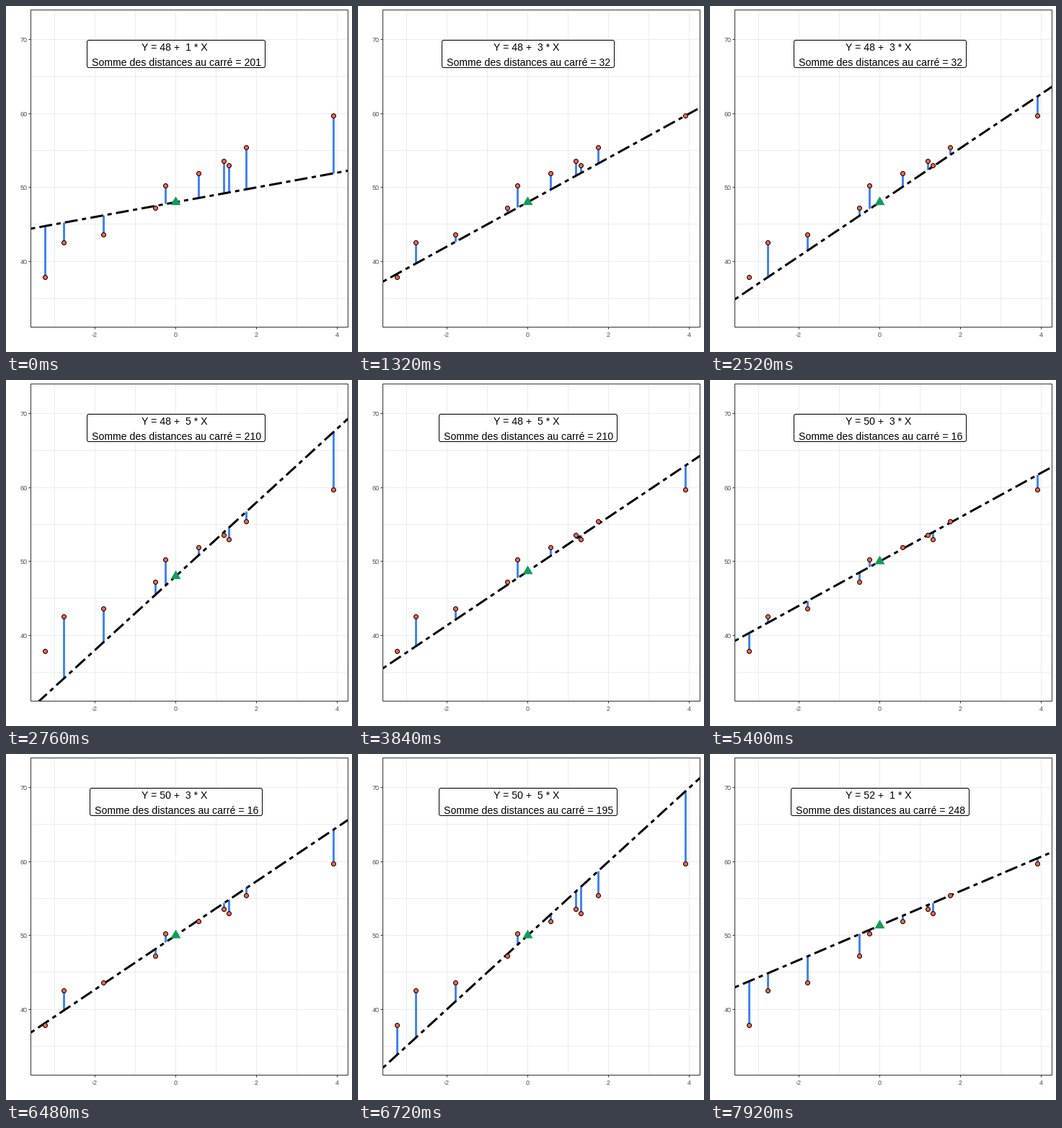
Recreate the animation shown at these times as a matplotlib script. Size 480 by 480 pixels, loop 8000 ms.

```python
import matplotlib.pyplot as plt
import numpy as np
from matplotlib.animation import FuncAnimation
from matplotlib.collections import LineCollection
from matplotlib.patches import FancyBboxPatch, Rectangle

SIZE, DPI = 480, 96
PT = 72 / DPI  # points per pixel
STEP, LOOP = 40, 8000
LEFT, RIGHT, TOP, BOTTOM = 34, 474, 5, 445
Y_MIN, Y_MAX = 33, 72  # gaps reaching outside are dropped
DARK, GRID = "#333333", "#EBEBEB"
HALF = 0.5  # pixel centre offset for shapes that are not snapped

plt.rcParams["font.family"] = "Liberation Sans"

# Pixels of the observations
PX = np.array([54, 80, 135, 207, 221, 267, 302, 309, 333, 454])
PY = np.array([376, 328, 317, 280, 249, 232, 215, 221, 196, 152])

# Intercept, slope, sum of squares
STATES = [(48, 1, 201), (48, 3, 32), (48, 5, 210), (50, 1, 185),
          (50, 3, 16), (50, 5, 195), (52, 1, 248)]
STARTS = [1080, 2520, 3840, 5160, 6480, 7800]
MOVE_STEP, MOVE_COUNT = 120, 3


def to_px(x):
    return 235 + 56.1 * x


def to_py(y):
    return 251.15 - 10.256 * (y - 50)


def to_x(px):
    return (px - 235) / 56.1


fig = plt.figure(figsize=(SIZE / DPI, SIZE / DPI), dpi=DPI, facecolor="white")
ax = fig.add_axes([0, 0, 1, 1])
ax.set_xlim(0, SIZE)
ax.set_ylim(SIZE, 0)
ax.axis("off")


def rule(xs, ys, color, z):
    ax.plot(xs, ys, color=color, lw=PT, solid_capstyle="butt", zorder=z)


def tick_label(x, y, value, align):
    ax.text(x, y, str(value), size=9 * PT, color="#4D4D4D",
            ha=align, va="baseline")


for x in range(-3, 5):
    px = round(to_px(x))
    rule([px, px], [TOP, BOTTOM], GRID, 1)
    if x % 2 == 0:
        rule([px, px], [BOTTOM, BOTTOM + 3], DARK, 2)
        tick_label(px, 459, x, "center")
for y in range(35, 75, 5):
    py = round(to_py(y))
    rule([LEFT, RIGHT], [py, py], GRID, 1)
    if y % 10 == 0:
        rule([LEFT - 3, LEFT], [py, py], DARK, 2)
        tick_label(29.5, py + 4, y, "right")

panel = Rectangle((LEFT, TOP), RIGHT - LEFT, BOTTOM - TOP, fill=False,
                  ec=DARK, lw=PT, zorder=9)
ax.add_patch(panel)

gaps = LineCollection([], colors="#4285F4", linewidths=3 * PT,
                      capstyle="butt", zorder=3)
ax.add_collection(gaps)
fit, = ax.plot([], [], color="black", lw=3 * PT, ls=(0, (2, 2, 6, 2)),
               dash_capstyle="butt", zorder=4)
fit.set_clip_path(panel)
ax.plot(PX, PY, "o", ms=6 * PT, mfc="#FF6347", mec="black", mew=PT, zorder=5)
pivot, = ax.fill([0, 1, 1], [0, 0, 1], color="#0F9D58", lw=0, zorder=6)

box = FancyBboxPatch((0, 0), 1, 1, boxstyle="round,pad=0,rounding_size=2.6",
                     fc="white", ec="black", lw=PT, zorder=7)
ax.add_patch(box)
equation = ax.text(233.5, 62, "", size=14.1 * PT, ha="center",
                   va="baseline", zorder=8)
total = ax.text(236.7, 83, "", size=14.1 * PT, ha="center",
                va="baseline", zorder=8)


def move_at(t):
    """Return the states moved between and the progress at time t."""
    k = sum(start <= t for start in STARTS)
    if k == 0:
        return STATES[0], STATES[0], 1
    p = min(1, ((t - STARTS[k - 1]) // MOVE_STEP + 1) / MOVE_COUNT)
    return STATES[k - 1], STATES[k], p


def in_limits(state):
    feet = state[0] + state[1] * to_x(PX)
    return (feet > Y_MIN) & (feet < Y_MAX)


def update(i):
    old, new, p = move_at(i * STEP)
    a, b = (o + (n - o) * p for o, n in zip(old[:2], new[:2]))
    label = new if p > 0.5 else old

    ends = np.array([LEFT, RIGHT])
    fit.set_data(ends + HALF, to_py(a + b * to_x(ends)) + HALF)

    shown = in_limits(new)
    if p < 1:
        shown &= in_limits(old)
    feet = to_py(a + b * to_x(PX))
    gaps.set_segments([[(x, y), (x, f)]
                       for x, y, f in zip(PX[shown], PY[shown], feet[shown])])

    cx, cy = 235 + HALF, to_py(a) + HALF
    pivot.set_xy([(cx, cy - 8), (cx + 7, cy + 4), (cx - 7, cy + 4)])

    half = 123.5 if label[2] > 99 else 119.5
    box.set_bounds(236 - half, 47.5, 2 * half, 38)
    equation.set_text(f"Y = {label[0]} +  {label[1]} * X")
    total.set_text(f"Somme des distances au carré = {label[2]}")
    return fit, gaps, pivot, box, equation, total


anim = FuncAnimation(fig, update, frames=LOOP // STEP, interval=STEP, repeat=True)
plt.show()
```
